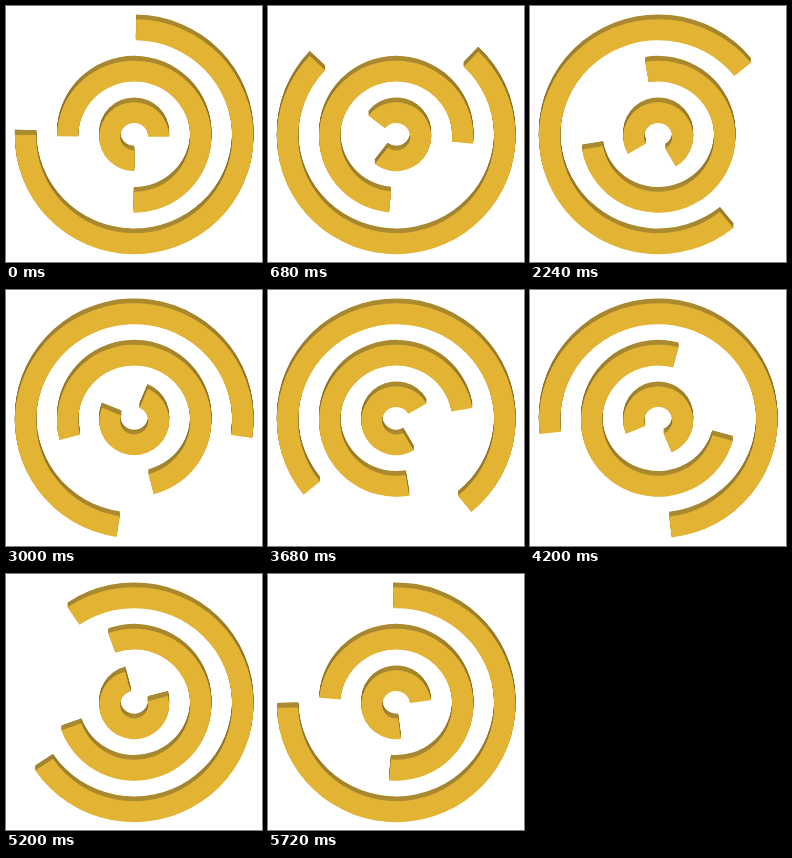
Recreate the animation shown at these times as an HTML page with a canvas. Size 256x256 px, loop 5760 ms.

```html
<!DOCTYPE html>
<html lang="en">
<head>
<meta charset="utf-8">
<title>Turning rings</title>
<style>
  html, body { margin: 0; width: 100%; height: 100%; overflow: hidden; background: #fff; }
  canvas { display: block; width: 100vw; height: 100vh; }
</style>
</head>
<body>
<canvas id="stage" width="256" height="256"></canvas>
<script>
const LOOP = 5760, STEP = 40;
const CX = 128.2, CY = 130.7;   // centre of the front faces
const TILT = 0.985, DEPTH = 4.8;
const FACE = '#e3b434';
const DARK = [126, 102, 38], LIGHT = [172, 139, 48];
const RAD = Math.PI / 180;

// gap: middle of the opening at time 0, degrees clockwise from the top
const rings = [
  { outer: 119.3, inner: 98, gap: 316, turns: 1 },
  { outer: 77.2, inner: 56, gap: 225.3, turns: -2 },
  { outer: 35, inner: 14, gap: 135, turns: 3 }
];

const ctx = document.getElementById('stage').getContext('2d');

function shade(up) {
  return `rgb(${DARK.map((d, i) => Math.round(d + (LIGHT[i] - d) * up))})`;
}

function point(r, a, lift) {
  return [CX + r * Math.sin(a), CY - lift - r * TILT * Math.cos(a)];
}

function fillArc(ring, from, to, lift, paint) {
  const q = Math.PI / 2, y = CY - lift;
  ctx.beginPath();
  ctx.ellipse(CX, y, ring.outer, ring.outer * TILT, 0, from - q, to - q);
  ctx.ellipse(CX, y, ring.inner, ring.inner * TILT, 0, to - q, from - q, true);
  ctx.closePath();
  ctx.fillStyle = paint;
  ctx.fill();
}

function fillCap(ring, a, up) {
  if (up <= 0) return;
  const corners = [
    point(ring.inner, a, 0), point(ring.outer, a, 0),
    point(ring.outer, a, DEPTH), point(ring.inner, a, DEPTH)
  ];
  ctx.beginPath();
  corners.forEach(p => ctx.lineTo(...p));
  ctx.closePath();
  ctx.fillStyle = shade(up);
  ctx.fill();
}

function drawRing(ring, phase) {
  const mid = (ring.gap + 360 * ring.turns * phase) * RAD;
  const from = mid + 45 * RAD, to = from + 270 * RAD;

  // walls are lightest where they face up
  const y = CY - DEPTH / 2;
  const wall = ctx.createLinearGradient(0, y - ring.outer, 0, y + ring.inner);
  wall.addColorStop(0, shade(1));
  wall.addColorStop(ring.outer / (ring.outer + ring.inner), shade(0));
  wall.addColorStop(1, shade(1));

  for (let lift = DEPTH; lift > 0; lift -= 0.6) fillArc(ring, from, to, lift, wall);
  fillCap(ring, from, Math.sin(from));
  fillCap(ring, to, -Math.sin(to));
  fillArc(ring, from, to, 0, FACE);
}

const start = performance.now();

function draw() {
  const t = Math.max(0, performance.now() - start) % LOOP;
  const phase = Math.floor(t / STEP) * STEP / LOOP;
  ctx.fillStyle = '#fff';
  ctx.fillRect(0, 0, 256, 256);
  rings.forEach(ring => drawRing(ring, phase));
  requestAnimationFrame(draw);
}
draw();
</script>
</body>
</html>
```
